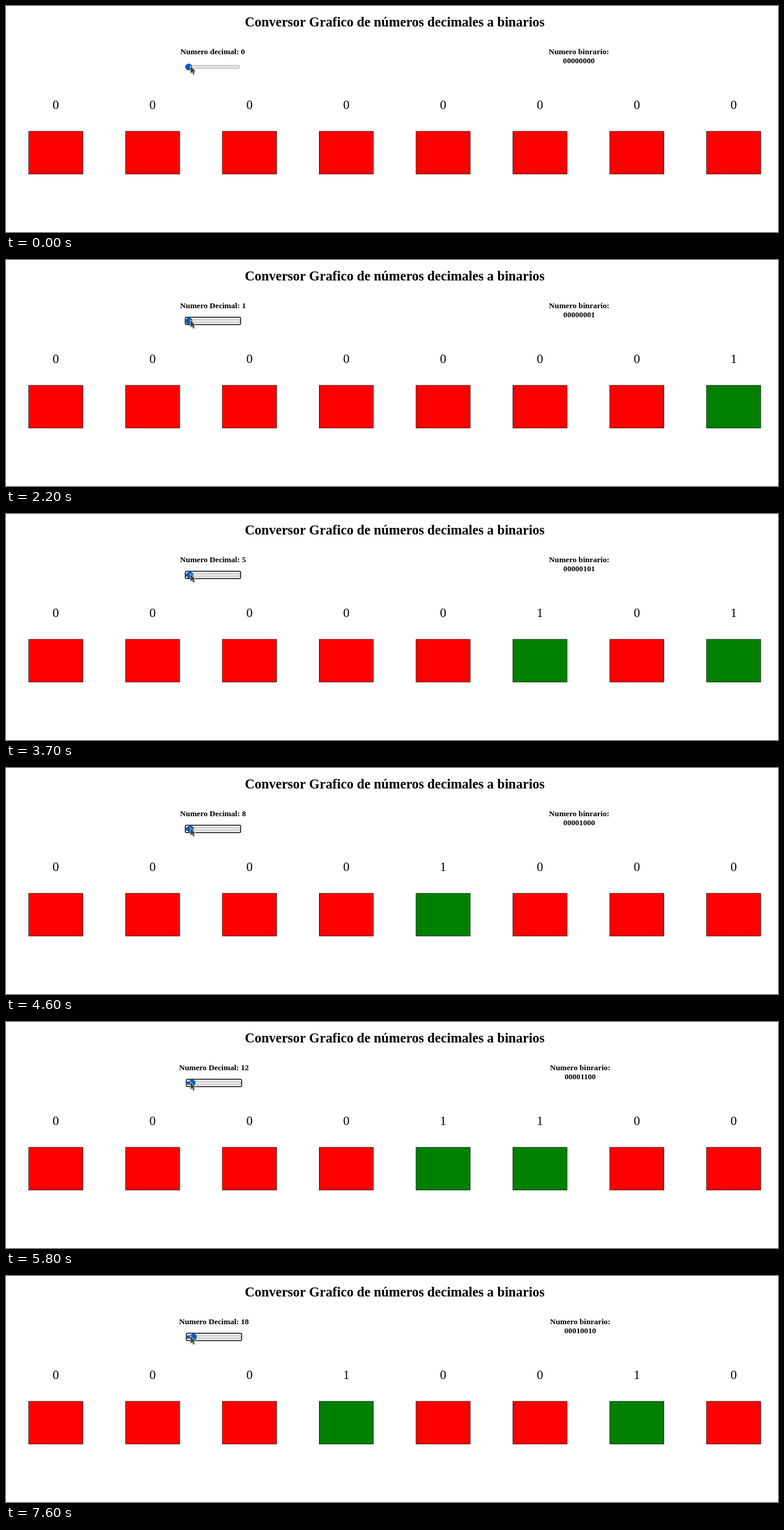
Write an HTML page with a canvas that moves like this. It is 1280 px wide and 375 px high and loops after 8 s.

```html
<!DOCTYPE html>
<html lang="es">
<head>
<meta charset="utf-8">
<title>Conversor</title>
<style>
  html, body { margin: 0; width: 1280px; height: 375px; overflow: hidden; background: #fff; }
  canvas { display: block; }
</style>
</head>
<body>
<canvas id="stage" width="1280" height="375"></canvas>
<script>
const ctx = document.getElementById('stage').getContext('2d');
const LOOP = 8000;
const SCALE = 0.7018;              // page zoom: CSS pixels to stage pixels
const SERIF = '"Liberation Serif", "Times New Roman", serif';
const MIDDLE = 644.5, ROW = 1214.4;
const LEFT = MIDDLE - ROW / 2;
const BOX_W = 90.5, BOX_H = 71.6, BOX_Y = 207.6;
const SLIDER_W = 90.5, SLIDER_Y = 101.2, THUMB_R = 5.6;
const PRESS = 800, RELEASE = 1000;
const STEPS = [2200, 2600, 3000, 3300, 3700, 4000, 4300, 4600, 4900,
               5200, 5500, 5800, 6200, 6500, 6800, 7000, 7300, 7600];
const HOVER = { accent: '#005cc8', track: '#e5e5e5', edge: '#a0a0a0' };
const ACTIVE = { accent: '#3793ff', track: '#f5f5f5', edge: '#c4c4c4' };

function setFont(cssSize, weight = 'normal') {
  ctx.font = `${weight} ${cssSize * SCALE}px ${SERIF}`;
}

function text(str, x, y) {
  ctx.fillStyle = '#000';
  ctx.fillText(str, x, y);
}

function pill(x, y, w, h, r) {
  ctx.beginPath();
  ctx.roundRect(x, y, w, h, r);
}

function drawSlider(center, value, pressed) {
  const x = center - SLIDER_W / 2;
  const colors = pressed ? ACTIVE : HOVER;
  // The thumb snaps to whole CSS pixels.
  const travel = (SLIDER_W / SCALE - 16) / 255;
  const offset = Math.floor(value * travel + (value > 9 ? 0.3 : 0)) * SCALE;
  const thumbX = x + THUMB_R + offset;

  pill(x + 0.35, SLIDER_Y - 2.6, SLIDER_W - 0.7, 5.2, 2.6);
  ctx.fillStyle = colors.track;
  ctx.fill();
  ctx.strokeStyle = colors.edge;
  ctx.lineWidth = 0.8;
  ctx.stroke();

  ctx.fillStyle = colors.accent;
  pill(x, SLIDER_Y - 2.8, thumbX - x, 5.6, 2.8);
  ctx.fill();
  ctx.beginPath();
  ctx.arc(thumbX, SLIDER_Y, THUMB_R, 0, Math.PI * 2);
  ctx.fill();

  if (value > 0) {
    pill(x - 0.6, SLIDER_Y - 6.1, SLIDER_W + 1.2, 12.2, 2);
    ctx.strokeStyle = '#101010';
    ctx.lineWidth = 1.5;
    ctx.stroke();
  }
}

function drawCursor() {
  ctx.save();
  ctx.translate(305.6, 99.4);
  ctx.beginPath();
  ctx.moveTo(0, 0);
  ctx.lineTo(0.6, 12);
  ctx.lineTo(3.2, 10);
  ctx.lineTo(4.9, 14);
  ctx.lineTo(7, 13);
  ctx.lineTo(5.4, 9.2);
  ctx.lineTo(8.6, 8.8);
  ctx.closePath();
  ctx.shadowColor = 'rgba(0,0,0,0.3)';
  ctx.shadowBlur = 2;
  ctx.shadowOffsetY = 0.7;
  ctx.lineJoin = 'round';
  ctx.lineWidth = 1.3;
  ctx.strokeStyle = '#f0f0f0';
  ctx.stroke();
  ctx.shadowColor = 'transparent';
  ctx.fillStyle = '#444';
  ctx.fill();
  ctx.restore();
}

function drawBits(bits) {
  const pitch = (ROW - BOX_W) / 7;
  setFont(30);
  [...bits].forEach((bit, i) => {
    const x = LEFT + i * pitch;
    text(bit, x + BOX_W / 2, 171);
    ctx.fillStyle = '#000';
    ctx.fillRect(x, BOX_Y, BOX_W, BOX_H);
    ctx.fillStyle = bit === '1' ? '#008000' : '#f00';
    ctx.fillRect(x + SCALE, BOX_Y + SCALE, BOX_W - 2 * SCALE, BOX_H - 2 * SCALE);
  });
}

function draw(t) {
  const value = STEPS.filter(step => step <= t).length;
  const bits = value.toString(2).padStart(8, '0');
  ctx.fillStyle = '#fff';
  ctx.fillRect(0, 0, 1280, 375);
  ctx.textAlign = 'center';

  setFont(32, 'bold');
  text('Conversor Grafico de números decimales a binarios', MIDDLE, 34);

  // Two columns spaced around the row: both shift as the first label grows.
  setFont(18.72, 'bold');
  const label = `Numero ${value ? 'D' : 'd'}ecimal: ${value}`;
  const heading = 'Numero binrario:';
  const shift = (ctx.measureText(label).width - ctx.measureText(heading).width) / 4;
  const first = LEFT + ROW / 4 + shift;
  const second = first + ROW / 2;
  text(label, first, 79.6);
  text(heading, second, 79.6);
  text(bits, second, 95);

  drawBits(bits);
  drawSlider(first, value, t >= PRESS && t < RELEASE);
  drawCursor();
}

const start = performance.now();
function tick() {
  draw((performance.now() - start) % LOOP);
  requestAnimationFrame(tick);
}
tick();
</script>
</body>
</html>
```
